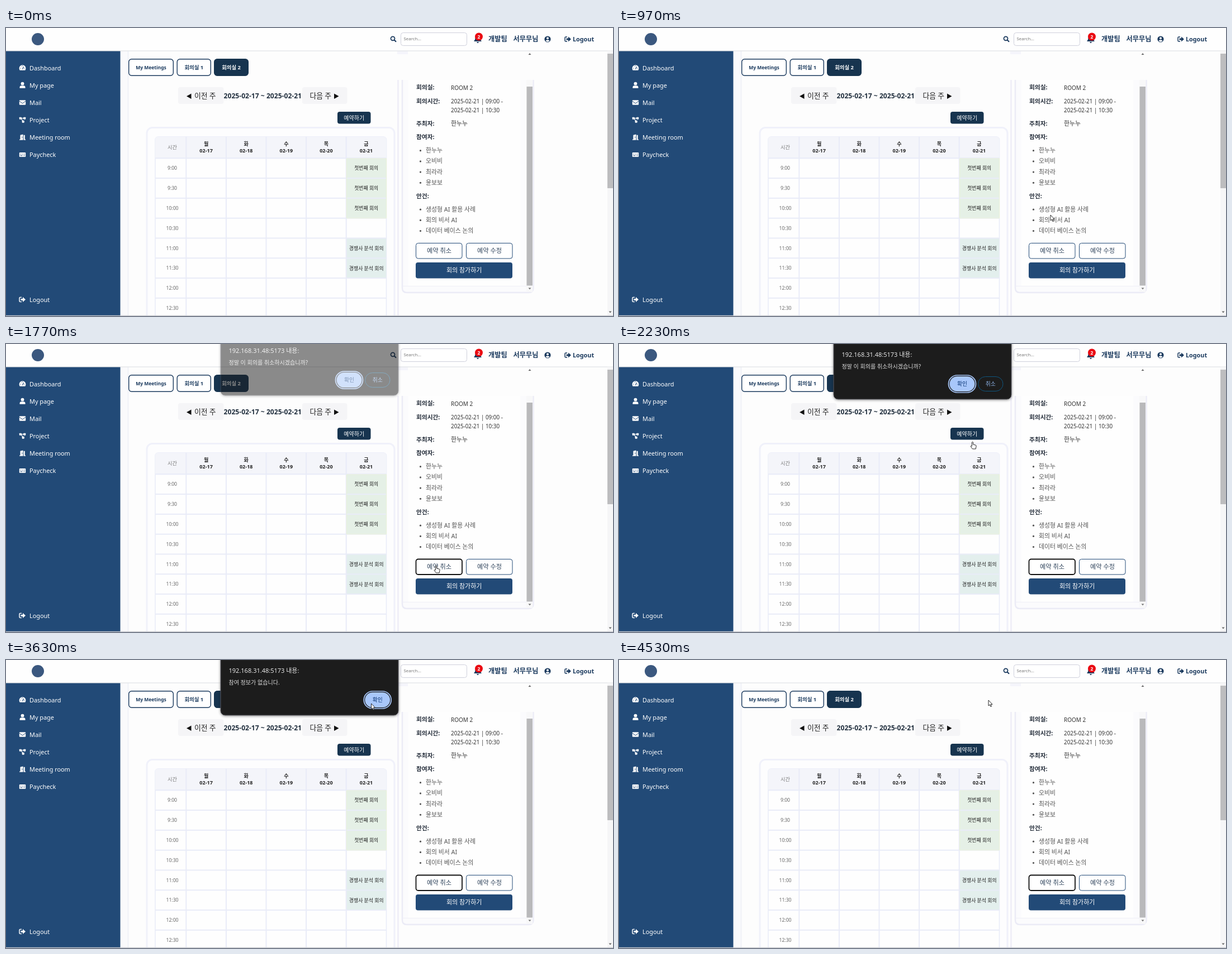
An HTML page that plays this animation: 1086x516 px, repeating every 4560 ms.

```html
<!DOCTYPE html>
<html lang="ko">
<head>
<meta charset="utf-8">
<title>Meeting room</title>
<style>
html, body { margin: 0; width: 100%; height: 100%; overflow: hidden; background: #fdfdfd; }
svg { display: block; width: 1086px; height: 516px; }
text { font-family: "Noto Sans", "Noto Sans CJK KR", "Noto Sans CJK", sans-serif; white-space: pre; }
</style>
</head>
<body>
<svg id="stage" viewBox="0 0 1086 516"></svg>
<script>
const NAVY = '#1b3a5e', BLUE = '#224a77', DARK = '#17344f', LINE = '#e9ecf8', SKY = '#a8c7fa';
const LOOP = 4560;

// Text is placed by its vertical middle.
const text = (x, cy, size, str, fill = '#333', weight = 400, anchor = 'start') =>
  `<text x="${x}" y="${cy + size * 0.36}" font-size="${size}" fill="${fill}" font-weight="${weight}" text-anchor="${anchor}">${str}</text>`;
const mid = (x, cy, size, str, fill, weight) => text(x, cy, size, str, fill, weight, 'middle');
const box = (x, y, w, h, fill, r = 0, extra = '') =>
  `<rect x="${x}" y="${y}" width="${w}" height="${h}" rx="${r}" fill="${fill}" ${extra}/>`;
const stroke = (color, width = 1) => `stroke="${color}" stroke-width="${width}"`;
const path = (d, fill, extra = '') => `<path d="${d}" fill="${fill}" ${extra}/>`;
const icon = (cx, cy, body) => `<g transform="translate(${cx} ${cy})">${body}</g>`;

const exitIcon = color =>
  path('M-1-4H-3.5Q-5-4-5-2.5V2.5Q-5 4-3.5 4H-1', 'none', stroke(color, 1.5)) +
  path('M-2.5-1.5H1V-4.5L6 0 1 4.5V1.5H-2.5Z', color);
const personIcon = path('M-5 5.5V4Q-5 .8-2 .8H2Q5 .8 5 4V5.5Z', '#fff') + '<circle cy="-2.7" r="2.9" fill="#fff"/>';

const menu = [
  ['Dashboard', path('M-4.8 4.5A5.9 5.9 0 1 1 4.8 4.5Z', '#fff') +
    path('M0 2.5 2-2M-3.8 1H-2.8M-2.5-2.5-2-2M0-4V-3M2.8 1H3.8', 'none', stroke(BLUE, 1.2))],
  ['My page', personIcon],
  ['Mail', box(-5.7, -4.3, 11.4, 8.6, '#fff', 1.2) + path('M-5.7-2.5 0 1.6 5.7-2.5', 'none', stroke(BLUE))],
  ['Project', path('M-3-3H3M-3-3 1.5 3', 'none', stroke('#fff', 1.2)) +
    box(-5.7, -5, 4, 4, '#fff', .7) + box(1.7, -5, 4, 4, '#fff', .7) + box(-.8, 1, 4, 4, '#fff', .7)],
  ['Meeting room', path('M-5.5 5V3.8H-4V-4L1-5.2V5ZM2-4H4.3V3.8H5.6V5H2Z', '#fff') + '<circle cx="-.7" r=".8" fill="' + BLUE + '"/>'],
  ['Paycheck', box(-5.7, -4, 11.4, 8, '#fff', 1) + path('M-4 1.8H0M2 1.8H4M-4-1H-2.5M-1-1H.5M2-1H4', 'none', stroke(BLUE))]
];

function sidebar() {
  return box(0, 41, 204.5, 474, BLUE) +
    menu.map(([label, art], i) => {
      const y = 71.7 + i * 31.15;
      return icon(29.5, y - .5, art) + text(42, y, 10.9, label, '#fff');
    }).join('') +
    icon(29, 486.5, exitIcon('#fff')) + text(42, 487.5, 10.9, 'Logout', '#fff');
}

function header() {
  return box(0, 0, 1086, 41, '#fefefe') + box(0, 40.5, 1086, 1, '#dcdde2') +
    `<circle cx="57" cy="20" r="11" fill="#3b587f"/>` +
    `<circle cx="692" cy="18.8" r="3.5" fill="none" ${stroke(NAVY, 1.8)}/>` +
    path('M694.7 21.5 698 24.8', 'none', stroke(NAVY, 2.1)) +
    box(706.5, 8.5, 118, 23, '#fff', 4, stroke('#cfd0dc')) +
    text(711.5, 19.5, 7.9, 'Search...', '#777') +
    path('M837.5 23Q839.5 21 839.5 18 839.5 14 844 13.5 848.5 14 848.5 18 848.5 21 850.5 23V24H837.5ZM842 25H846Q845.5 27 844 27 842.5 27 842 25Z', NAVY) +
    '<circle cx="846" cy="15.5" r="7" fill="#ea0a12"/>' + mid(846, 15.7, 8.5, '2', '#fff', 700) +
    text(863, 20, 12.2, '개발팀', NAVY, 700) + text(907.5, 20, 12.2, '서무무님', NAVY, 700) +
    `<circle cx="969" cy="20" r="5.6" fill="${NAVY}"/><circle cx="969" cy="18.2" r="2" fill="#fff"/>` +
    path('M965.5 23.3Q966 21.2 969 21.2T972.5 23.3Q969 26 965.5 23.3Z', '#fff') +
    icon(1005, 20, exitIcon(NAVY)) + text(1014, 20.3, 10.8, 'Logout', NAVY, 700);
}

function calendar() {
  const colX = i => 322.3 + i * 71.6, rowY = i => 233.3 + i * 35.8;
  let s = box(252, 178.5, 443, 350, '#fdfdfe', 10, stroke('#f0f1fa', 3)) +
    box(267, 195, 413.5, 340, '#fefefe', 5, stroke(LINE, 1.5)) +
    path('M267 233V200Q267 195 272 195H675.5Q680.5 195 680.5 200V233Z', '#f4f5fa');
  for (let i = 0; i < 6; i++) {
    if (i == 3) continue;
    if (i > 3 && i > 5) break;
    s += box(colX(4), rowY(i), 71.6, 35.8, i < 3 ? '#e5f0e6' : '#e3efed');
  }
  for (let i = 0; i < 5; i++) s += box(colX(i) - 1, 195, 2, 321, LINE);
  for (let i = 0; i < 8; i++) s += box(267, rowY(i) - 1, 413.5, 2, LINE);
  s += box(609.5, 234, 71, 106.5, 'none', 0, stroke('#e9f3d8')) +
    mid(297.5, 213.5, 9.2, '시간', '#777');
  ['월', '화', '수', '목', '금'].forEach((day, i) => {
    const x = colX(i) + 35.8;
    s += mid(x, 207.3, 9, day, '#222', 700) + mid(x, 219.5, 9, '02-' + (17 + i), '#222', 700);
  });
  for (let i = 0; i < 8; i++) {
    const y = rowY(i) + 18;
    s += mid(297.5, y, 8.6, `${9 + (i >> 1)}:${i % 2 ? '30' : '00'}`, '#666');
    if (i < 3) s += mid(644.7, y, 8.85, '첫번째 회의', '#222', 500);
    if (i == 4 || i == 5) s += mid(644.7, y, 8.9, '경쟁사 분석 회의', '#222', 500);
  }
  return s;
}

function mainPanel() {
  const tab = (x, w, label, size, on) =>
    box(x + .7, 55.7, w - 1.4, 29.6, on ? DARK : '#fff', 5, stroke(on ? DARK : NAVY, 1.4)) +
    mid(x + w / 2, 70.6, size, label, on ? '#fff' : NAVY, on ? 700 : 600);
  return box(204.5, 41, 14, 474, '#fafafc') + box(217.5, 41, 2, 474, '#f0f1f8') +
    box(700, 93, 3, 422, '#f0eff8') + box(700, 41, 19, 6, '#f5f5fb') +
    tab(219, 81, 'My Meetings', 8.5) + tab(305.5, 61.5, '회의실 1', 9.4) + tab(372, 62, '회의실 2', 9.4, true) +
    box(308, 106, 81.5, 30, '#f5f5f7', 4) + box(530, 106, 80.5, 30, '#f5f5f7', 4) +
    path('M331.5 117.5V127L323 122.2Z', '#111') + path('M587 117.5V127L595.5 122.2Z', '#111') +
    text(337, 121.5, 12.8, '이전 주', '#222') + text(543.5, 121.5, 12.8, '다음 주', '#222') +
    mid(459.3, 122, 12.1, '2025-02-17 ~ 2025-02-21', '#22303f', 700) +
    box(593, 150, 59.5, 21.5, DARK, 4) + mid(622.7, 161, 10, '예약하기', '#fff') +
    calendar();
}

function detailPanel() {
  const label = (y, str) => text(734, y, 10.7, str, '#222b38', 700);
  const list = (y, items) => items.map((str, i) =>
    `<circle cx="741.5" cy="${y + i * 19.2 + .5}" r="1.6" fill="#555"/>` + text(751, y + i * 19.2, 10.85, str, '#555')).join('');
  return path('M709 93V466Q709 474 717 474H935Q943.5 474 943.5 466V93', '#fbfbfd', stroke('#ebebf6', 2.5)) +
    box(720, 93, 200, 369, '#fefefe') + box(709, 462, 222, 1, '#efeff7') +
    box(931, 93, 11.5, 380, '#f8f8f9') + box(931.5, 105, 10.5, 356.5, '#b9b9bb') +
    path('M934.5 465.5H939.5L937 468.5Z', '#777') + path('M934.5 48H939.5L937 45Z', '#666') +
    label(106.5, '회의실:') + text(796, 107, 10, 'ROOM 2') +
    label(131, '회의시간:') + text(796, 131.2, 9.85, '2025-02-21 | 09:00 -') + text(796, 147.2, 9.85, '2025-02-21 | 10:30') +
    label(171, '주최자:') + text(796, 171, 10.85, '한누누') +
    label(195.5, '참여자:') + list(219.2, ['한누누', '오비비', '최라라', '윤보보']) +
    label(301, '안건:') + list(324.7, ['생성형 AI 활용 사례', '회의 비서 AI', '데이터 베이스 논의']) +
    box(733.5, 385.5, 82.5, 27.5, '#fff', 4, `id="cancel" ${stroke(BLUE)}`) + mid(775, 399, 11.2, '예약 취소', '#33475f') +
    box(823.5, 385.5, 82.5, 27.5, '#fff', 4, stroke(BLUE)) + mid(865, 399, 11.2, '예약 수정', '#33475f') +
    box(733, 420, 173, 28.5, BLUE, 4) + mid(819.7, 434.5, 11, '회의 참가하기', '#fff');
}

function dialog(id, message, okX, hasCancel) {
  return `<g id="${id}">` +
    box(384, -40, 318, 139, '#1f1f1f', 8, `${stroke('#55555a')} filter="url(#shade)"`) +
    text(398.5, 18.7, 11, '192.168.31.48:5173 내용:', '#e6e6e6') +
    text(398.5, 40, 10.05, message, '#dcdcdc') +
    box(okX - 24.5, 56, 49, 31, 'none', 15.5, `class="ring" ${stroke(SKY, 1.7)}`) +
    box(okX - 22.5, 58, 45, 27, SKY, 13.5) + mid(okX, 71.5, 9.8, '확인', '#0a3575') +
    (hasCancel ? box(642.5, 58.5, 44.5, 26, 'none', 13, stroke('#0f567f')) + mid(664.7, 71.5, 9.8, '취소', '#8fb5ea') : '') +
    '</g>';
}

const $ = id => document.getElementById(id);
$('stage').innerHTML =
  '<filter id="shade" x="-10%" y="-10%" width="120%" height="120%"><feDropShadow dx="0" dy="1" stdDeviation="2" flood-opacity=".45"/></filter>' +
  box(0, 0, 1086, 516, '#fdfdfd') + mainPanel() + detailPanel() + sidebar() + header() +
  box(1076, 41, 10, 474, '#f6f6f7') + box(1076, 46, 10, 241, '#bdbdbf') + path('M1078.5 507.5H1083.5L1081 510.5Z', '#666') +
  box(0, 514.8, 1086, 1.2, '#c6c8ce') +
  dialog('ask', '정말 이 회의를 취소하시겠습니까?', 614, true) +
  dialog('notice', '참여 정보가 없습니다.', 664.7, false) +
  '<g id="cursor">' +
  path('M0 0V10L2.3 8 4 11.6 5.5 11 4 7.4H7Z', '#fff', 'id="arrow" stroke="#111" stroke-width=".9"') +
  path('M-1.1 1Q0-.7 1.1 1V5L5.7 6.2Q6.9 6.6 6.6 8L5.7 13H0L-3.4 8.5Q-3.4 6.9-1.1 8.1Z', '#fff', 'id="hand" stroke="#111" stroke-width=".9"') +
  '</g>';

const clamp = v => Math.max(0, Math.min(1, v));
const progress = (t, from, to) => clamp((t - from) / (to - from));
const smooth = p => p * p * (3 - 2 * p);

// time, x, y of the pointer tip
const route = [
  [350, 1092, 520], [900, 772, 335], [1050, 772, 335], [1420, 769.5, 397], [1900, 769.5, 397],
  [2230, 632.5, 175], [2600, 609.5, 78], [2960, 609.5, 78], [3480, 653.5, 78], [4330, 653.5, 78], [4500, 661, 72]
];

function pointerAt(t) {
  const next = route.findIndex(k => k[0] > t);
  if (next < 0) return route[route.length - 1].slice(1);
  if (!next) return route[0].slice(1);
  const a = route[next - 1], b = route[next], p = smooth(progress(t, a[0], b[0]));
  return [a[1] + (b[1] - a[1]) * p, a[2] + (b[2] - a[2]) * p];
}

function showDialog(id, t, open, close, press) {
  const shown = progress(t, open, open + 160), hidden = progress(t, close, close + 140);
  const fade = shown * (1 - clamp((hidden - .2) / .8));
  const g = $(id);
  g.setAttribute('opacity', fade);
  g.setAttribute('transform', `translate(0 ${-14 * (1 - shown + hidden)})`);
  g.querySelector('.ring').setAttribute('visibility', t < press ? 'visible' : 'hidden');
}

function draw(now) {
  const t = now % LOOP;
  const focused = t >= 1650;
  $('cancel').setAttribute('stroke', focused ? '#111' : BLUE);
  $('cancel').setAttribute('stroke-width', focused ? 1.8 : 1);
  showDialog('ask', t, 1690, 2875, 2800);
  showDialog('notice', t, 3040, 4220, 4150);
  const [x, y] = pointerAt(t), overButton = t > 1330 && t < 2300;
  $('cursor').setAttribute('transform', `translate(${x} ${y})`);
  $('arrow').setAttribute('visibility', overButton ? 'hidden' : 'visible');
  $('hand').setAttribute('visibility', overButton ? 'visible' : 'hidden');
  requestAnimationFrame(() => draw(performance.now() - start));
}
const start = performance.now();
draw(0);
</script>
</body>
</html>
```
